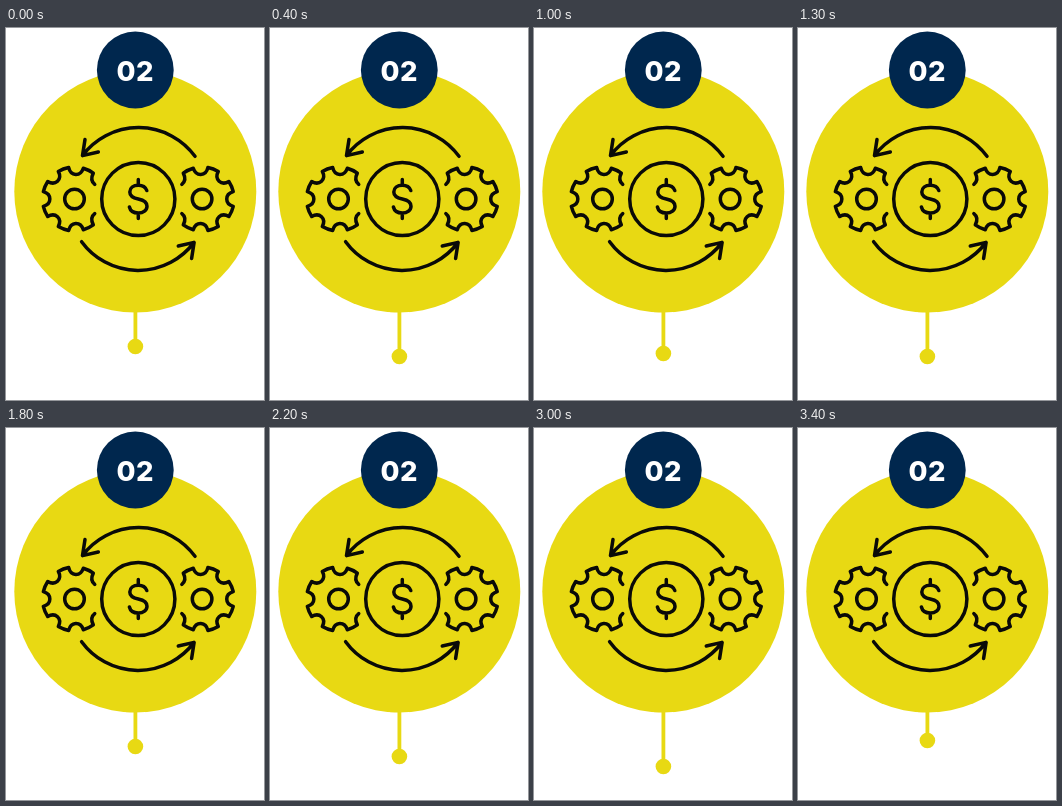
Recreate the animation shown at these times as an HTML page. Size 258 px wide and 372 px high, loop 3500 ms.

```html
<!DOCTYPE html>
<html lang="en">
<head>
<meta charset="utf-8">
<title>Step 02</title>
<style>
  html, body { margin: 0; width: 100%; height: 100%; overflow: hidden; background: #fff; }
  svg { display: block; width: 258px; height: 372px; }
  .yellow { fill: #e8d913; }
  .navy { fill: #00274e; }
  .icon { fill: none; stroke: #0a0a08; stroke-width: 3.5; stroke-linecap: round; stroke-linejoin: round; }
  .number { font: 800 27.5px Inter, Lato, sans-serif; letter-spacing: 0.4px; fill: #fff; }
</style>
</head>
<body>
<svg viewBox="0 0 258 372">
  <rect id="stem" class="yellow" x="127.5" y="280" width="3.8" height="38"/>
  <circle id="dot" class="yellow" cx="129.4" cy="318.5" r="7.8"/>
  <circle class="yellow" cx="129.3" cy="163.5" r="121"/>
  <circle class="navy" cx="129.3" cy="42" r="38.4"/>
  <text class="number" x="110.6" y="53">02</text>

  <g class="icon">
    <g id="half">
      <path id="gear"/>
      <circle cx="68.5" cy="171" r="9.8"/>
      <path d="M189 128.300A70 70 0 0 0 76.500 127.600M79 111.500L76.500 127.600L92.300 124"/>
    </g>
    <use href="#half" transform="rotate(180 132.300 171)"/>
    <circle cx="132.300" cy="171" r="36.600"/>
    <path d="M132.300 151.500V157M132.300 185V190.500M140.800 162.500C139.500 159 136.500 157.200 132.300 157.200C127.300 157.200 123.800 160 123.800 163.900C123.800 168.500 127.800 170 132.300 171C137.300 172 141 173.700 141 178.200C141 182.200 137.300 185 132.300 185C127.800 185 124.300 182.800 123.400 179"/>
  </g>
</svg>
<script>
  const stem = document.getElementById("stem");
  const dot = document.getElementById("dot");

  // Open gear: six wide teeth with scooped valleys, and a gap facing the coin.
  function gearPath(cx, cy, outer, scoop) {
    const point = (deg, r) => {
      const a = deg * Math.PI / 180;
      return `${(cx + r * Math.cos(a)).toFixed(2)} ${(cy - r * Math.sin(a)).toFixed(2)} `;
    };
    const first = 64, half = 10, pitch = (360 - 2 * first) / 5;
    let d = "M" + point(36, 25) + "Q" + point(51, 24) + point(first - half, outer);
    for (let i = 0; i < 6; i++) {
      const end = first + i * pitch + half;
      const next = end + pitch - 2 * half;
      d += `A${outer} ${outer} 0 0 0 ${point(end, outer)}`;
      if (i < 5) d += "C" + point(end + 1, scoop) + point(next - 1, scoop) + point(next, outer);
    }
    return d + "Q" + point(-51, 24) + point(-36, 25);
  }
  document.getElementById("gear").setAttribute("d", gearPath(68.5, 171, 32, 23));

  // Dot heights over one bob; the loop restarts partway through the last bob.
  const bob = [318, 325, 332, 338, 328, 321, 316, 312, 310];
  const LOOP = 3500, STEP = 100;

  function draw(time) {
    const y = bob[Math.floor((time % LOOP) / STEP) % bob.length] + 0.5;
    dot.setAttribute("cy", y);
    stem.setAttribute("height", y - 280);
  }

  const start = performance.now();
  function tick() {
    draw(performance.now() - start);
    requestAnimationFrame(tick);
  }
  tick();
</script>
</body>
</html>
```
